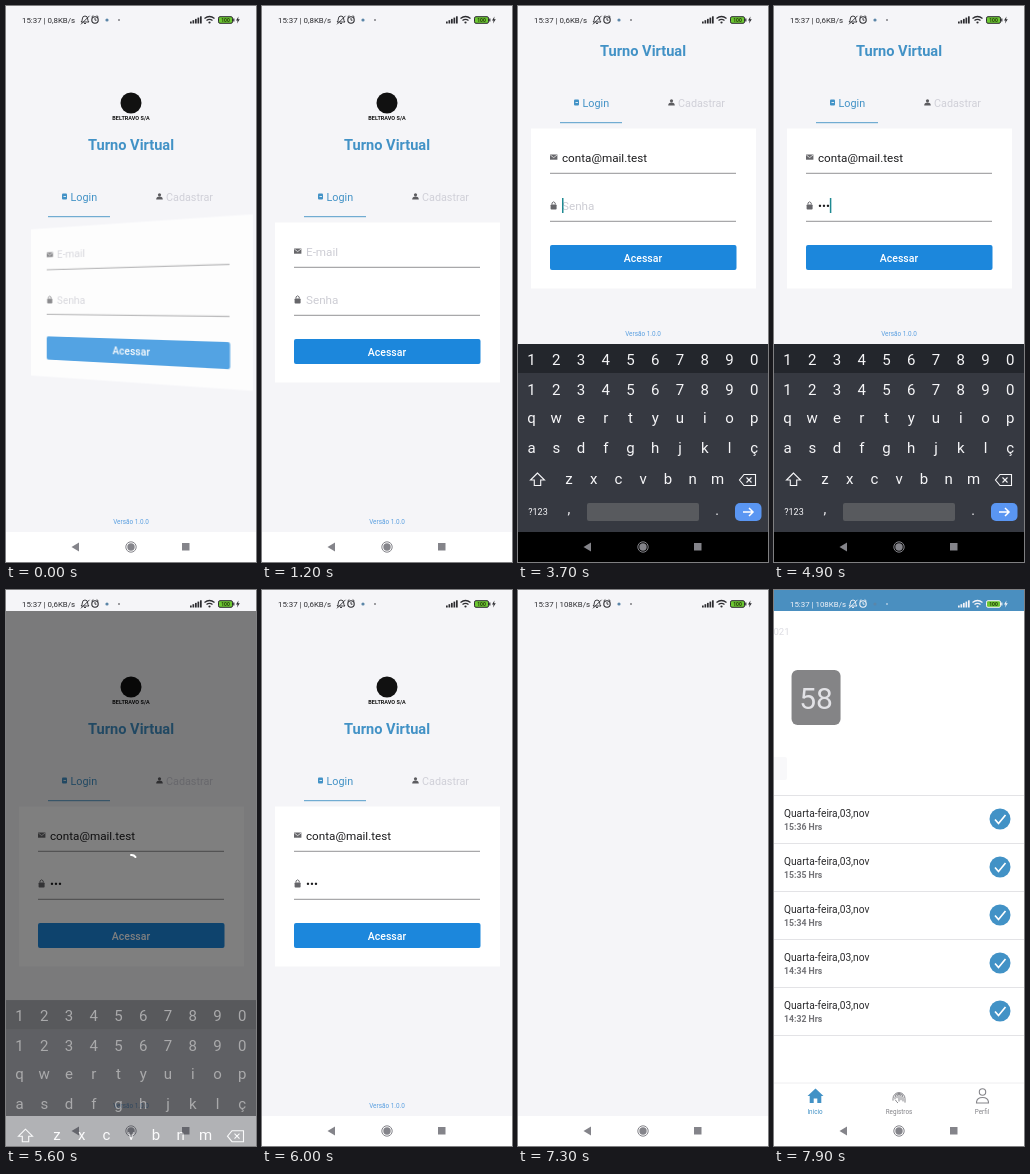
These frames come from a looping animation (250 px wide and 556 px high, 8 s). An HTML page:

```html
<!DOCTYPE html>
<html lang="pt">
<head>
<meta charset="utf-8">
<title>Login</title>
<style>
html, body { margin: 0; width: 100%; height: 100%; overflow: hidden; background: #f5f5f8; }
#stage { position: relative; width: 250px; height: 556px; overflow: hidden; }
#stage svg, #page, #dim { position: absolute; left: 0; top: 0; width: 250px; height: 556px; }
#card { transform-origin: 125px 296px; }
#stage #dim { top: 21px; height: 505px; background: rgba(0, 0, 0, .5); }
text { font-family: Roboto, "Noto Sans", sans-serif; white-space: pre; }
</style>
</head>
<body>
<div id="stage"></div>
<script>
const LOOP = 8000, EMAIL = 'conta@mail.test';
const PAPER = '#f5f5f8', BLUE = '#4292c6', INK = '#f6f6f8', SOFT = '#c2c3c8';
const $ = id => document.getElementById(id);
const clamp = v => Math.max(0, Math.min(1, v));
const text = (x, y, s, size, fill, more = '') =>
  `<text x="${x}" y="${y}" font-size="${size}" fill="${fill}" ${more}>${s}</text>`;
const mid = (x, y, s, size, fill, more = '') => text(x, y, s, size, fill, 'text-anchor="middle" ' + more);
const rect = (x, y, w, h, fill, more = '') =>
  `<rect x="${x}" y="${y}" width="${w}" height="${h}" fill="${fill}" ${more}/>`;
const dot = (x, y, r, fill, more = '') => `<circle cx="${x}" cy="${y}" r="${r}" fill="${fill}" ${more}/>`;
const ring = (x, y, r, color, w = 1) => dot(x, y, r, 'none', `stroke="${color}" stroke-width="${w}"`);
const line = (d, stroke, w = 1, more = '') =>
  `<path d="${d}" fill="none" stroke="${stroke}" stroke-width="${w}" ${more}/>`;
const fill = (d, color) => `<path d="${d}" fill="${color}"/>`;
const svg = (id, body) => `<svg id="${id}" viewBox="0 0 250 556">${body}</svg>`;
const group = (id, body) => `<g id="${id}">${body}</g>`;
const person = (x, y, c) => dot(x, y - 1.7, 1.6, c) + fill(`M${x - 3.3} ${y + 3}q0-3 3.3-3t3.3 3z`, c);

function header() {
  return dot(125, 97, 10.5, '#111') +
    mid(125, 114, 'BELTRAVO S/A', 5.5, '#111', 'font-weight="700"') +
    mid(125, 144, 'Turno Virtual', 14.6, BLUE, 'font-weight="700"') +
    rect(56, 187.5, 5, 6, BLUE, 'rx="1"') + line('M57.5 190.5h2.5', '#fff', .8) +
    text(64.5, 195, 'Login', 10.8, BLUE) +
    person(153.5, 190.5, '#5c5c60') + text(160, 195, 'Cadastrar', 10.8, '#d0d0d8') +
    line('M42 210.7H104', BLUE, .9);
}

function card() {
  const gray = '#66666a';
  return rect(13, 216.5, 225, 160, '#fff') +
    rect(32, 242.5, 7.4, 5.2, gray) + line('M32.3 243l3.4 2.6 3.4-2.6', '#fff', .7) +
    rect(32.6, 292.5, 6, 5, gray, 'rx=".8"') + line('M34 292.5v-1.6q1.6-2.2 3.2 0v1.6', gray, .9) +
    line('M32 261.3H218M32 309.3H218', '#77777a', .8) +
    text(44, 249.5, '', 11.7, '', 'id="email"') + text(44, 297.7, '', 11.7, '', 'id="pass"') +
    rect(0, 0, 1.5, 15, '#1f8a92', 'id="caret"') +
    rect(32, 333, 186.5, 25, '#1c87dc', 'rx="2"') +
    mid(125, 349.5, 'Acessar', 10.5, '#fff', 'font-weight="500"');
}

const keyRow = (keys, x, y) => [...keys].map((k, i) => mid(x + 24.75 * i, y, k, 15, INK)).join('');

function toolbar() {
  const strip = '#23262c';
  return dot(16, 353, 10, '#fff') + line('M17.8 349.5l-3.5 3.5 3.5 3.5', '#333', 1.3) +
    line('M49 347.5v11M43.5 353h11M45.1 349.1l7.8 7.8M45.1 356.9l7.8-7.8', SOFT, 2) +
    dot(49, 353, 3.6, SOFT) + dot(49, 353, 1.8, strip) +
    rect(80, 347.5, 7, 8, SOFT) + rect(84, 350.5, 6.5, 8, strip, `stroke="${SOFT}"`) +
    mid(83.2, 354, 'G', 5.5, strip) + mid(87.4, 357, 'x', 5.5, SOFT) +
    dot(121, 353, 5.4, SOFT) + [[118, 353], [119.5, 350.3], [122.6, 350.3], [124.2, 353]]
      .map(([x, y]) => dot(x, y, .9, strip)).join('') + dot(123.5, 357, 1.8, strip) +
    rect(152, 348.5, 9, 10, 'none', `stroke="${SOFT}" stroke-width="1.2"`) + rect(154, 347, 5, 3, SOFT) +
    line('M154 352.5h5M154 355h4', SOFT, .9) + line('M179.5 343v20', '#45484e', .8) +
    [196.5, 201, 205.5].map(x => dot(x, 353, 1.2, SOFT)).join('') +
    rect(235, 347, 4, 7, SOFT, 'rx="2"') +
    line('M232.5 352q0 4 4.5 4t4.5-4M237 356v3M231 347l11 11', SOFT, 1.1);
}

function keyboard() {
  const space = '#585a5e';
  return rect(0, 338, 250, 188, '#363941') + rect(0, 338, 250, 29, '#23262c') +
    keyRow('1234567890', 13.5, 388.5) + keyRow('qwertyuiop', 13.5, 417) +
    keyRow('asdfghjklç', 13.5, 447) + keyRow('zxcvbnm', 51, 478) +
    line('M19.5 467l-7 7h3.8v5.5h6.4v-5.5h3.8z', INK, 1.1) +
    line('M226 468.5h11.5v11H226l-4.5-5.5zM228.5 471.5l5 5m0-5l-5 5', INK, 1.1) +
    mid(20, 508.5, '?123', 9, INK) + mid(199, 509, '.', 14, INK) +
    rect(217, 497, 26.5, 18, '#5a96f2', 'rx="5"') +
    group('mailKeys', toolbar() + mid(50.5, 509, '@', 12, INK) +
      ring(75.5, 504.5, 5.5, INK) + dot(73.5, 503, .8, INK) + dot(77.5, 503, .8, INK) +
      line('M72.5 506q3 3 6 0', INK, .9) + rect(94, 497, 87, 18, space, 'rx="2"') +
      line('M225.5 506l3.5 3.5 6.5-7', '#fff', 1.6)) +
    group('passKeys', keyRow('1234567890', 13.5, 358.5) + mid(51, 508, ',', 14, INK) +
      rect(69, 497, 112, 18, space, 'rx="2"') +
      line('M225 506h10m-4-4l4 4-4 4', '#fff', 1.5));
}

function status() {
  const c = 'currentColor';
  const bars = [0, 1, 2, 3, 4]
    .map(i => rect(184 + i * 2.5, 15.5 - i * 1.3, 1.7, 2 + i * 1.3, c)).join('');
  return rect(0, 0, 250, 21, '', 'id="bar"') + text(16, 17, '', 7.9, c, 'id="speed"') +
    line('M75 16q1.3-1 1.3-3 0-3 2.7-3t2.7 3q0 2 1.3 3zM75 18.3l8.5-8.5M78 17.5h2', c, .9) +
    ring(89, 14, 3.2, c, 1.1) +
    line('M89 12v2.2h1.5M85.5 11l1.8-1.4M92.5 11l-1.8-1.4', c, .9) +
    dot(101, 14, 1.6, '#5b86a8') + dot(113, 14, .8, c) + bars +
    line('M198.5 12.5q5-4 10 0M200.5 14.5q3-2.4 6 0', c, 1.3) + dot(203.5, 16.5, 1.1, c) +
    rect(212.5, 10.7, 14, 6.6, '#6cc832', `rx="1.5" stroke="${c}"`) + rect(227.2, 12.5, 1.2, 3, c) +
    mid(219.5, 16, '100', 5, '#22350a', 'font-weight="700"') +
    fill('M232.5 10.5l-2.5 4h1.6l-.6 3 2.8-4.2h-1.7z', c);
}

function nav() {
  const c = '#84848a';
  return rect(0, 526, 250, 30, '', 'id="navBg"') + fill('M65.5 541l7.5-4.5v9z', c) +
    ring(125, 541, 5.2, c) + dot(125, 541, 3.7, c) + rect(176, 537, 7.5, 7.5, c);
}

function home() {
  const gray = '#85858a', rule = '#dcdce0';
  const items = ['15:36', '15:35', '15:34', '14:34', '14:32'].map((hour, i) => {
    const y = 205 + 48 * i;
    return text(10, y + 22, 'Quarta-feira,03,nov', 10.2, '#2a2a2c') +
      text(10, y + 35, hour + ' Hrs', 8.7, '#727276', 'font-weight="700"') +
      dot(226, y + 24, 10.5, BLUE) + line(`M221 ${y + 24.5}l3.5 4 7-8.5`, '#fff', 1.7) +
      line(`M0 ${y + 48.5}H250`, rule, .8);
  }).join('');
  const box = (x, s) => rect(x - 24.5, 80, 49, 55, '#848486', 'rx="6"') + mid(x, 119, s, 30, '#e2e2e6');
  const tab = (x, s, c) => mid(x, 524, s, 6.3, c);
  return rect(0, 21, 250, 505, '#fff') +
    group('clock', mid(125, 45, '03/novembro/2021', 9.6, '#dcdce2') +
      box(57, '15') + box(125, '36') + box(193, '58') + rect(86, 167, 78, 23, '#f8f8fa', 'rx="2"')) +
    group('list', line('M0 205.5H250', rule, .8) + items) +
    line('M0 493H250', '#eeeef0') +
    fill('M33.5 506l8-7.5 8 7.5h-2.2v7h-4v-4.5h-3.6v4.5h-4v-7z', BLUE) +
    [2, 4, 6].map(r => line(`M${125 - r} ${507 + r * .6}v-2a${r} ${r} 0 0 1 ${2 * r} 0v4`, gray)).join('') +
    line('M125 504.5v7M121.5 510q1 2 2.5 3', gray) +
    ring(208.5, 502, 3.2, gray, 1.1) + line('M202.5 513q0-5.5 6-5.5t6 5.5z', gray, 1.1) +
    tab(41, 'Início', BLUE) + tab(125, 'Registros', gray) + tab(208, 'Perfil', gray);
}

$('stage').innerHTML = `<div id="page">${svg('head', header())}${svg('card', card())}` +
  svg('version', mid(125, 518, 'Versão 1.0.0', 6.4, '#5a9fe0')) + '</div><div id="dim"></div>' +
  svg('home', home()) + svg('nav', nav()) + svg('keys', keyboard()) + svg('status', status()) +
  svg('spin', line('M125 265a5 5 0 0 1 4.5 2', '#fff', 2, 'stroke-linecap="round" id="arc"'));

const show = (id, on) => { $(id).style.display = on ? '' : 'none'; };

// Progress and angle of the card's swing around its vertical axis
const FLIP = [[0, 90], [.4, -20], [.6, 10], [.8, -5], [1, 0]];
function flipAngle(p) {
  const i = Math.max(1, FLIP.findIndex(k => k[0] >= p));
  const [a, u] = FLIP[i - 1], [b, v] = FLIP[i];
  return u + (v - u) * (p - a) / (b - a);
}

// Fills an input and returns the width of what was typed
function field(id, value, hint) {
  const el = $(id);
  el.textContent = value || hint;
  el.setAttribute('fill', value ? '#1c1c1e' : '#cdcdd4');
  return value ? el.getComputedTextLength() : 0;
}

function draw(t) {
  const typing = t >= 1900 && t < 5500, onPass = t >= 3700, atHome = t >= 7500;

  const p = 1 - .55 * (1 - clamp(t / 800)) ** 2;
  $('card').style.transform = p < 1 ? `perspective(254px) rotateY(${flipAngle(p)}deg)` : 'none';
  $('card').style.opacity = Math.min(1, p / .6);
  $('page').style.transform = `translateY(${typing ? -94 : 0}px)`;
  $('version').style.transform = `translateY(${typing ? -94 : 0}px)`;
  $('page').style.opacity = 1 - clamp((t - 6500) / 200);

  const typed = Math.floor(15 * clamp((t - 2320) / 1200));
  const dots = [4200, 4500, 4800].filter(k => t >= k).length;
  const mailW = field('email', EMAIL.slice(0, typed), 'E-mail');
  const passW = field('pass', '•'.repeat(dots), 'Senha');
  const busy = (typed > 0 && typed < 15) || (dots > 0 && dots < 3);
  show('caret', typing && (busy || (t - (onPass ? 3700 : 2100) + 50) % 1000 < 500));
  $('caret').setAttribute('x', 44 + (onPass ? passW : mailW));
  $('caret').setAttribute('y', onPass ? 286 : 237);

  const hidden = t < 4000 ? 1 - clamp((t - 1860) / 220) : clamp((t - 5500) / 263);
  $('keys').style.transform = `translateY(${188 * hidden}px)`;
  $('keys').style.opacity = 1 - clamp(hidden * 1.6);
  show('mailKeys', !onPass);
  show('passKeys', onPass);
  $('navBg').setAttribute('fill', typing ? '#000' : '#fff');

  const loading = t >= 5500 && t < 5900;
  show('dim', loading);
  show('spin', loading);
  $('arc').setAttribute('transform', `rotate(${(t - 5600) * .6} 125 270)`);

  show('home', atHome);
  show('list', t >= 7600);
  $('clock').setAttribute('transform', `translate(${-151.5 - .55 * (7900 - t)} 0)`);
  $('bar').setAttribute('fill', atHome ? '#4a8fc0' : PAPER);
  $('status').style.color = atHome ? '#f4f4f8' : '#2c2c30';
  $('speed').textContent = '15:37 | ' + (t < 2800 ? '0,8' : t < 7300 ? '0,6' : '108') + 'KB/s';
}

const start = performance.now();
function tick() {
  draw((performance.now() - start) % LOOP);
  requestAnimationFrame(tick);
}
tick();
</script>
</body>
</html>
```
